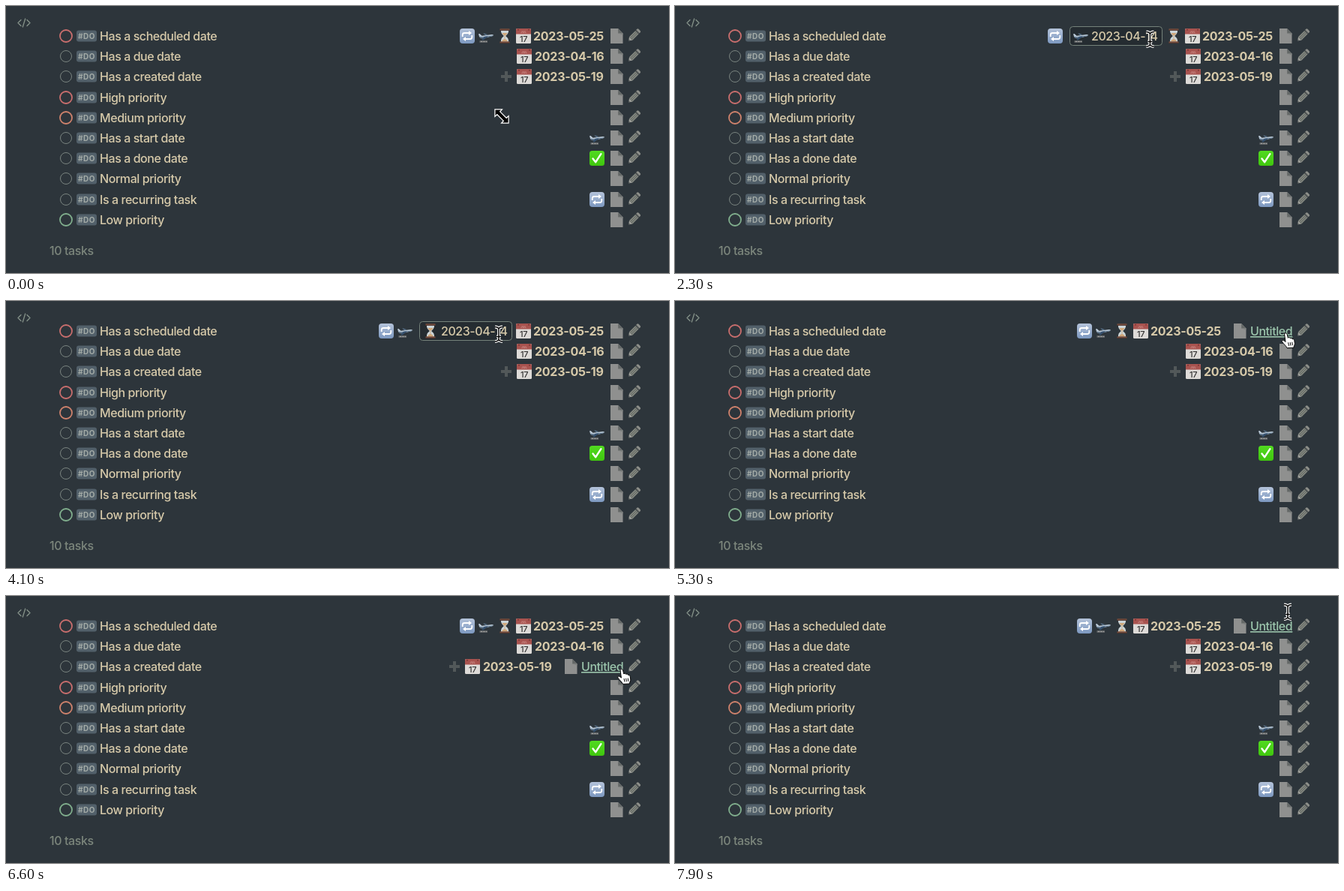
These frames come from a looping animation (884x356 px, 8 s). An HTML page:

```html
<!DOCTYPE html>
<html lang="en">
<head>
<meta charset="utf-8">
<title>Task list</title>
<style>
  html, body { margin: 0; width: 100%; height: 100%; overflow: hidden; background: #2d353b; }
  svg { display: block; }
  text { font: 500 16px Inter, "Liberation Sans", sans-serif; letter-spacing: -.43px; fill: #d7caaa; }
  .date { font-weight: 700; letter-spacing: -.27px; }
  .tag { font-size: 10px; font-weight: 700; letter-spacing: .5px; fill: #a3aba7; }
  .count { fill: #7c867c; }
  .link { fill: #9cc6ad; text-decoration: underline; text-decoration-thickness: 1px; text-underline-offset: 2px; }
  .pill { fill: #252c31; stroke: #75827a; }
  .day { font-size: 11px; letter-spacing: -.3px; fill: #333; text-anchor: middle; }
  .month { font-size: 4px; letter-spacing: 0; fill: #dba9a3; text-anchor: middle; }
</style>
</head>
<body>
<svg id="stage" width="884" height="356" viewBox="0 0 884 356">
  <defs>
    <linearGradient id="blue" x2="0" y2="1">
      <stop stop-color="#b4c3da"/><stop offset="1" stop-color="#7c98c0"/>
    </linearGradient>
    <linearGradient id="green" x2="0" y2="1">
      <stop stop-color="#52da20"/><stop offset="1" stop-color="#3fc60e"/>
    </linearGradient>

    <g id="repeat">
      <rect x="-10" y="-10" width="20" height="20" rx="4" fill="url(#blue)"/>
      <path d="M-6.3 1V-1.5Q-6.3-4-3.8-4H2.5M6.3-1V1.5Q6.3 4 3.8 4H-2.5" fill="none" stroke="#fff" stroke-width="1.8"/>
      <path d="M2-7 6-4 2-1ZM-2 7-6 4-2 1Z" fill="#fff"/>
    </g>

    <g id="plane">
      <path d="M-8.5 6.2H2V8.7H-8.5Z" fill="#6d7072"/>
      <path d="M-7 7.4H1" stroke="#b5b5b1" stroke-width=".8" stroke-dasharray="2 1.4"/>
      <path d="M-10-2.8-8.4-3-5.4-.2 5.5-1.8Q9.5-2.3 10-1.2Q9.8 .2 6.4 .8L-5 3.2Q-8.2 3.4-9 .8Z" fill="#b9c8d6"/>
      <path d="M-9 .8Q-8.2 3.4-5 3.2L6.4 .8Q9 .3 9.8-.7L-5 1.6Z" fill="#546b82"/>
      <path d="M3 0-3.8 5.4-5.6 5.3-2.2 .8Z" fill="#34506f"/>
      <path d="M-3.8-3.2-2.2-3.4 3-1.5-.5-.9Z" fill="#5b748d"/>
    </g>

    <g id="glass">
      <path d="M-5-8H5V-5.5Q4.5-2.5 1.2 0Q4.5 2.5 5 5.5V8H-5V5.5Q-4.5 2.5-1.2 0Q-4.5-2.5-5-5.5Z" fill="#ccd5d8"/>
      <path d="M-3.6-4H3.6Q2.6-1.8 0 0Q-2.6-1.8-3.6-4ZM-.4 0H.4V4Q3.5 4.8 4 7.5H-4Q-3.5 4.8-.4 4Z" fill="#cfa678"/>
      <path d="M-6.5-9.8H6.5V-7.3H-6.5ZM-6.5 7.3H6.5V9.8H-6.5Z" fill="#744c3e"/>
      <path d="M-6.5-7.6H6.5M-6.5 9.5H6.5" stroke="#432d27" stroke-width=".7"/>
    </g>

    <g id="calendar">
      <rect x="-10" y="-10" width="20" height="20" rx="1.5" fill="#dedbd8"/>
      <path d="M-10-2.5V-8.5Q-10-10-8.5-10H8.5Q10-10 10-8.5V-2.5Z" fill="#a9534f"/>
      <path d="M-7-9V-7.6M7-9V-7.6" stroke="#6b302d" stroke-width="1.4"/>
      <text class="month" x="0" y="-4">JUL</text>
      <text class="day" x="0" y="7.6">17</text>
    </g>

    <path id="plus" d="M-2-7H2V-2H7V2H2V7H-2V2H-7V-2H-2Z" fill="#525859"/>

    <g id="check">
      <rect x="-10" y="-10" width="20" height="20" rx="3.5" fill="url(#green)"/>
      <path d="M-5.5 .5-1.8 5.2 5.4-5.8" fill="none" stroke="#fff" stroke-width="2.4" stroke-linecap="round" stroke-linejoin="round"/>
    </g>

    <g id="doc">
      <path d="M-8-10H2.2L8.5-3.5V10H-8Z" fill="#8f908f"/>
      <path d="M2.2-10 8.5-3.5H2.2Z" fill="#646867"/>
      <path d="M2.2-3.5H8.5V-1.5Z" fill="#7f8180"/>
    </g>

    <g id="pencil" transform="rotate(-45)">
      <path d="M-10.5 0-6-3.1V3.1Z" fill="#9c9d98"/>
      <path d="M-10.5 0-8.8-1.1V1.1Z" fill="#454a4b"/>
      <path d="M-6-3.1H5.5V3.1H-6Z" fill="#83877f"/>
      <path d="M-6-1H5.5M-6 1.1H5.5" stroke="#555b59" stroke-width=".8"/>
      <path d="M5.5-3.1H7V3.1H5.5Z" fill="#4d5252"/>
      <path d="M7-3.1H8.4Q10-3.1 10-1.5V1.5Q10 3.1 8.4 3.1H7Z" fill="#8d8f8a"/>
    </g>

    <path id="resize" d="M-8.5-8.5H-1L-3.2-6.2 6.2 3.2 8.5 1V8.5H1L3.2 6.2-6.2-3.2-8.5-1Z" stroke="#fff" stroke-width="2.4" paint-order="stroke"/>

    <path id="bar" d="M-5-9.5Q-1-9.3 0-7Q1-9.3 5-9.5M0-7V7.5M-5 10Q-1 9.8 0 7.5Q1 9.8 5 10M-3 3.5H3" fill="none"/>
    <g id="beam">
      <use href="#bar" stroke="#fff" stroke-width="3.8"/>
      <use href="#bar" stroke="#000" stroke-width="1.5"/>
    </g>

    <g id="hand" stroke="#000" stroke-linejoin="round">
      <path d="M-2 .8C-1.6-1 1-1 1.5.8L2.8 6C3.2 4.8 5.4 5 5.8 6.5C6.4 5.6 8.4 6 8.7 7.6C9.6 7 11 7.7 11.2 9.2L11.8 13C12 15.5 10.5 16.5 10.3 19L1.5 19.4C.6 17-3 14-5 11.2C-6 9.4-3.8 8.2-2 9.8L-.6 11.2Z" fill="#fff"/>
      <path d="M3 12 4 16.5M5.6 11.8 6.4 16.2M8.2 11.5 8.8 15.8" fill="none"/>
    </g>
  </defs>

  <path d="M20 18.5 16 22.5 20 26.5M28 18.5 32 22.5 28 26.5M25.7 17 22.3 28" fill="none" stroke="#859289" stroke-width="1.3" stroke-linecap="round" stroke-linejoin="round"/>
  <g id="list"></g>
  <text class="count" x="58" y="332">10 tasks</text>
  <use id="cursor"/>
</svg>

<script>
const LOOP = 8000, STEP = 100;
const RED = "#c96e6d", ORANGE = "#cf826c", GREEN = "#80ae8d", GRAY = "#7a8480";

// Each item on the right: icon, centre x, text, text x when always shown
const rows = [
  ["Has a scheduled date", RED, [["repeat", 615, "every day"], ["plane", 640, "2023-04-14"],
    ["glass", 665, "2023-04-14"], ["calendar", 690, "2023-05-25", 703]]],
  ["Has a due date", GRAY, [["calendar", 691, "2023-04-16", 705]]],
  ["Has a created date", GRAY, [["plus", 667, "2023-04-13"], ["calendar", 691, "2023-05-19", 705]]],
  ["High priority", RED, []],
  ["Medium priority", ORANGE, []],
  ["Has a start date", GRAY, [["plane", 788]]],
  ["Has a done date", GRAY, [["check", 788]]],
  ["Normal priority", GRAY, []],
  ["Is a recurring task", GRAY, [["repeat", 788]]],
  ["Low priority", GREEN, []]
];

// Hover states: start time, row, item index or "doc"
const hovers = [
  [0], [1100, 2, 0], [1800, 0, 2], [2200, 0, 1], [2700, 0, 0], [3400, 0, 1], [3700, 0, 2],
  [4500], [5200, 0, "doc"], [6200, 1, "doc"], [6500, 2, "doc"], [6700, 3, "doc"],
  [6800, 4, "doc"], [7000, 5, "doc"], [7400, 4, "doc"], [7500, 3, "doc"],
  [7600, 2, "doc"], [7700, 1, "doc"], [7800, 0, "doc"]
];

const path = [
  [0, 661, 147], [500, 661, 147], [1100, 665, 102], [1500, 660, 99], [1800, 658, 46],
  [2200, 638, 44], [2700, 615, 44], [3100, 609, 44], [3500, 636, 44], [3800, 655, 44],
  [4100, 657, 44], [4400, 666, 44], [5200, 814, 43], [5900, 818, 45], [6200, 821, 57],
  [6600, 821, 98], [7100, 820, 186], [7300, 820, 178], [7900, 817, 21]
];
const shapes = [[0, "resize"], [600, "beam"], [5300, "hand"], [6100, "beam"], [6400, "hand"], [7800, "beam"]];

const list = document.getElementById("list");
const cursor = document.getElementById("cursor");
const use = (id, x, y) => `<use href="#${id}" x="${x}" y="${y}"/>`;
const label = (s, x, y, cls = "") => `<text class="${cls}" x="${x}" y="${y + 6}">${s}</text>`;
const rowY = i => Math.round(40 + 27.2 * i);
const latest = (track, t) => track.filter(k => k[0] <= t).pop();

function drawItems(items, y, open) {
  const pill = items[open];
  const grow = !pill ? 0 : pill[0] === "repeat" ? 80 : 99;
  return items.map(([icon, x, text, textX], i) => {
    if (i === open) {
      const left = x - grow;
      return `<rect class="pill" x="${left - 14.5}" y="${y - 12.5}" width="${grow + 24}" height="25" rx="4"/>`
        + use(icon, left, y) + label(text, left + 14, y);
    }
    const dx = open === "doc" ? -69 : i < open ? -grow - 9 : 0;
    return use(icon, x + dx, y) + (textX ? label(text, textX + dx, y, "date") : "");
  }).join("");
}

function drawRow([name, color, items], i, open) {
  const y = rowY(i), plain = color === GRAY;
  return `<circle cx="80" cy="${y}" r="${plain ? 7.5 : 8}" fill="none" stroke="${color}" stroke-width="${plain ? 1 : 1.8}"/>`
    + `<rect x="94" y="${y - 7.5}" width="27" height="15" rx="3" fill="#52606a"/>`
    + `<text class="tag" x="96" y="${y + 3.7}">#DO</text>`
    + label(name, 125, y)
    + drawItems(items, y, open)
    + use("doc", open === "doc" ? 753 : 814, y)
    + (open === "doc" ? label("Untitled", 767, y, "link") : "")
    + use("pencil", 837.5, y - 1);
}

function cursorAt(t) {
  const n = path.findIndex(k => k[0] > t);
  if (n < 0) return path[path.length - 1].slice(1);
  const a = path[n - 1], b = path[n], p = (t - a[0]) / (b[0] - a[0]);
  return [1, 2].map(k => a[k] + (b[k] - a[k]) * p);
}

let lastStep, lastHover;
function render(now) {
  const t = Math.floor(now % LOOP / STEP) * STEP;
  if (t !== lastStep) {
    lastStep = t;
    const hover = latest(hovers, t);
    if (hover !== lastHover) {
      lastHover = hover;
      list.innerHTML = rows.map((row, i) => drawRow(row, i, i === hover[1] ? hover[2] : undefined)).join("");
    }
    const [x, y] = cursorAt(t);
    cursor.setAttribute("href", "#" + latest(shapes, t)[1]);
    cursor.setAttribute("transform", `translate(${x} ${y})`);
  }
  requestAnimationFrame(render);
}
render(performance.now());
</script>
</body>
</html>
```
